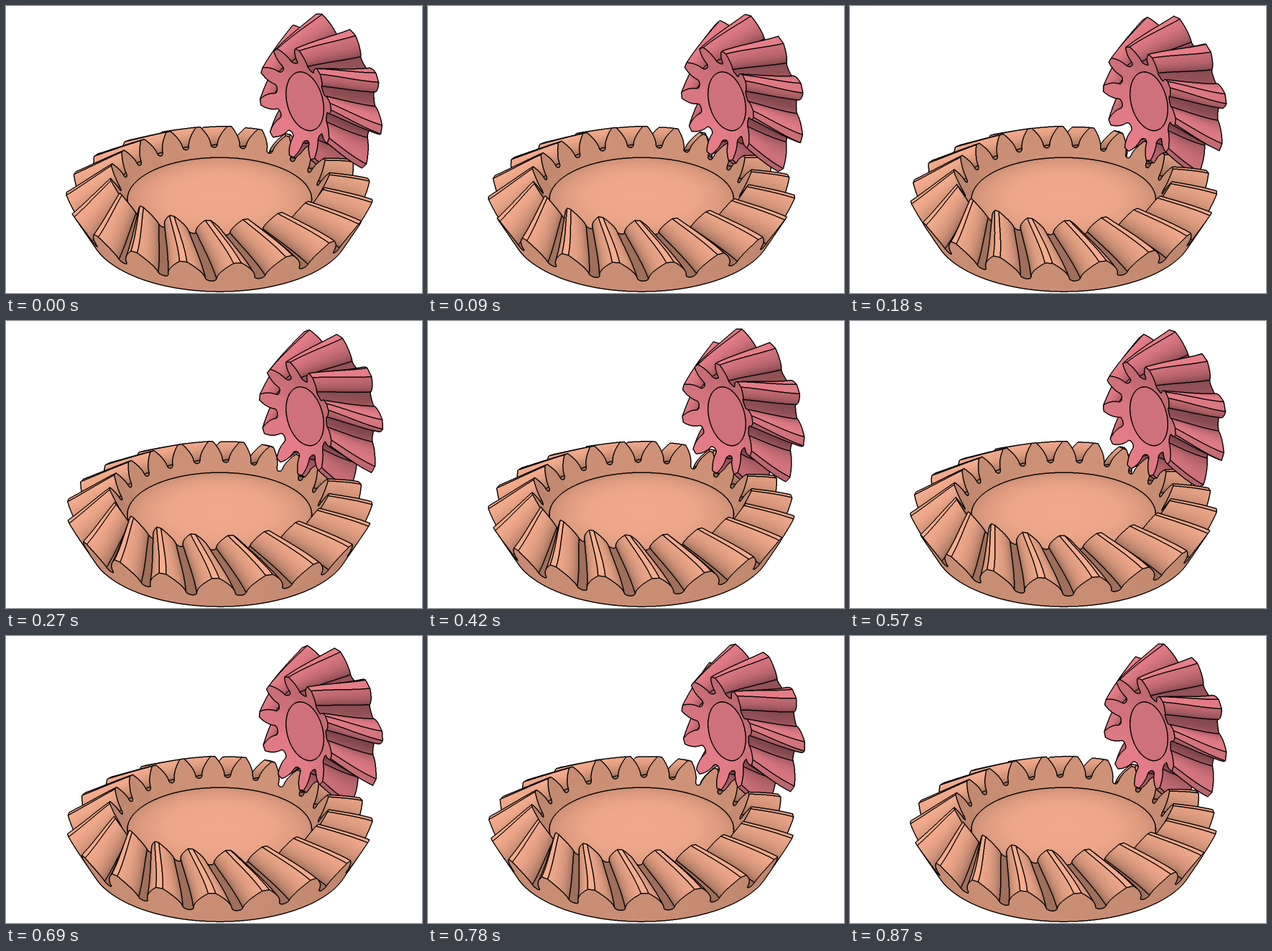
Write an HTML page with a canvas that moves like this. It is 579x400 px and loops after 900 ms.

```html
<!DOCTYPE html>
<html lang="en">
<head>
<meta charset="utf-8">
<title>Spiral bevel gears</title>
<style>
html, body { margin: 0; width: 100%; height: 100%; overflow: hidden; background: #fff; }
canvas { display: block; }
</style>
</head>
<body>
<canvas id="stage" width="579" height="400"></canvas>
<script>
const W = 579, H = 400, SS = 2, BW = W * SS, BH = H * SS;
const STEP = 30, STEPS = 15;
const RAD = Math.PI / 180;
const ctx = document.getElementById('stage').getContext('2d');

// Camera: origin at the centre of the ring's outer tip circle.
const DIST = 1500, CX = 297.5, CY = 252;
const SIN_E = 0.443, COS_E = Math.sqrt(1 - SIN_E * SIN_E);
const LIGHT = [-0.1, -0.42, 0.9];
const APEX = 94, AXIS = 34.7 * RAD;
const AX = Math.cos(AXIS), AY = Math.sin(AXIS);

const depth = new Float32Array(BW * BH);
const shade = new Float32Array(BW * BH);
const ids = new Uint16Array(BW * BH);

// Half a tooth mirrored: f is the share of one pitch, u the depth below the tip.
function toothProfile(tip, neck, power) {
  const half = [{ f: tip, u: 0, part: 0 }];
  for (let i = 1; i <= 6; i++) {
    half.push({ f: tip + (neck - tip) * (1 - (1 - i / 6) ** power), u: 0.85 * i / 6, part: 2 });
  }
  for (let i = 1; i <= 4; i++) {
    const a = i / 4 * Math.PI / 2;
    half.push({ f: neck + (0.5 - neck) * (1 - Math.cos(a)), u: 0.85 + 0.15 * Math.sin(a), part: 3 });
  }
  const left = half.map((p, i) => ({
    f: -p.f, u: p.u,
    part: i === 0 ? 0 : half[i].part === 2 ? 1 : 4
  })).reverse();
  // The part names the segment that ends at each point.
  const all = left.concat(half);
  const n = half.length;
  return all.map((p, i) => {
    if (i === 0 || i > n) return p;
    return { f: p.f, u: p.u, part: i === n ? 0 : all[i - 1].part };
  });
}

// Corner points are [radius, height along the axis]; index 0 is the inner end.
const ring = {
  teeth: 20, base: 0, phase: 12.4, turn: 1, spiral: 11.5, bow: 6,
  tip: [[151, 27], [211.5, 0]], root: [[136.7, -1.6], [193.6, -35.8]],
  rim: [[128.5, -14.6], [182.5, -58]],
  profile: toothProfile(0.07, 0.39, 1.6), endShade: [0.89, 1.03], discEdge: 0.86,
  place: (r, h, a) => [r * Math.cos(a), r * Math.sin(a), h]
};
const pinion = {
  teeth: 10, base: 100, phase: -2, turn: -1, spiral: -22, bow: -11,
  tip: [[82, 128], [118, 188]], root: [[56, 141], [80, 207]],
  rim: [[42.7, 147], null],
  profile: toothProfile(0.09, 0.31, 1.7), endShade: [1.06, 1], discEdge: 1.04,
  place: (r, h, a) => {
    const side = r * Math.sin(a);
    return [h * AX - side * AY, h * AY + side * AX, APEX + r * Math.cos(a)];
  }
};
const COLORS = [[237, 166, 137], [223, 122, 132]];

function project(p, lum) {
  const far = DIST + p[1] * COS_E - p[2] * SIN_E;
  const s = DIST / far;
  return {
    p, lum,
    x: (CX + s * p[0]) * SS,
    y: (CY - s * (p[2] * COS_E + p[1] * SIN_E)) * SS,
    z: s
  };
}

function fillTriangle(a, b, c, id, light) {
  const area = (b.x - a.x) * (c.y - a.y) - (b.y - a.y) * (c.x - a.x);
  if (Math.abs(area) < 1e-6) return;
  const x0 = Math.max(0, Math.ceil(Math.min(a.x, b.x, c.x) - 0.5));
  const x1 = Math.min(BW - 1, Math.floor(Math.max(a.x, b.x, c.x) - 0.5));
  const y0 = Math.max(0, Math.ceil(Math.min(a.y, b.y, c.y) - 0.5));
  const y1 = Math.min(BH - 1, Math.floor(Math.max(a.y, b.y, c.y) - 0.5));
  for (let y = y0; y <= y1; y++) {
    const py = y + 0.5;
    for (let x = x0; x <= x1; x++) {
      const px = x + 0.5;
      const wb = ((px - a.x) * (c.y - a.y) - (py - a.y) * (c.x - a.x)) / area;
      const wc = ((b.x - a.x) * (py - a.y) - (b.y - a.y) * (px - a.x)) / area;
      const wa = 1 - wb - wc;
      if (wa < -1e-5 || wb < -1e-5 || wc < -1e-5) continue;
      const i = y * BW + x;
      const z = wa * a.z + wb * b.z + wc * c.z;
      if (z <= depth[i]) continue;
      depth[i] = z;
      ids[i] = id;
      shade[i] = light * (wa * a.lum + wb * b.lum + wc * c.lum);
    }
  }
}

function lightOf(a, b, c) {
  const u = a.p.map((v, i) => b.p[i] - v), w = a.p.map((v, i) => c.p[i] - v);
  const n = [u[1] * w[2] - u[2] * w[1], u[2] * w[0] - u[0] * w[2], u[0] * w[1] - u[1] * w[0]];
  const len = Math.hypot(...n) || 1;
  const facing = n[2] * SIN_E - n[1] * COS_E < 0 ? -1 : 1;
  const dot = (n[0] * LIGHT[0] + n[1] * LIGHT[1] + n[2] * LIGHT[2]) * facing / len;
  return 0.83 + 0.19 * dot;
}

function quad(a, b, c, d, id) {
  const light = lightOf(a, b, d);
  fillTriangle(a, b, c, id, light);
  fillTriangle(a, c, d, id, light);
}

const mix = (a, b, t) => a + (b - a) * t;

function drawGear(g, time) {
  const pitch = 360 / g.teeth, ROWS = 10;
  const start = g.phase + g.turn * pitch * time;
  const angle = (k, f, v) => (start + pitch * (k + f) + g.spiral * v + g.bow * v * (1 - v)) * RAD;
  const vertex = (k, q, v, lum) => {
    const at = i => mix(mix(g.tip[0][i], g.tip[1][i], v), mix(g.root[0][i], g.root[1][i], v), q.u);
    return project(g.place(at(0), at(1), angle(k, q.f, v)), lum);
  };
  const rimVertex = (k, f, end, scale, lum) =>
    project(g.place(g.rim[end][0] * scale, g.rim[end][1], angle(k, f, end)), lum);
  const rings = [0, 0.4, 0.6, 0.8, 0.9, 1];
  const discLum = s => mix(g === ring ? 1.01 : 1.04, g.discEdge, s ** 4);

  for (let k = 0; k < g.teeth; k++) {
    const rows = [];
    for (let j = 0; j <= ROWS; j++) {
      rows.push(g.profile.map(q => vertex(k, q, j / ROWS, 1.02 - 0.36 * q.u ** 1.7)));
    }
    for (let i = 1; i < g.profile.length; i++) {
      const q0 = g.profile[i - 1], q1 = g.profile[i];
      // Both fillets of one groove share an id.
      const groove = q1.part === 3 ? (k + 1) % g.teeth : k;
      const id = g.base + 4 + groove * 4 + Math.min(q1.part, 3);
      for (let j = 0; j < ROWS; j++) {
        quad(rows[j][i - 1], rows[j][i], rows[j + 1][i], rows[j + 1][i - 1], id);
      }
      for (let end = 0; end < 2; end++) {
        if (!g.rim[end]) continue;
        const lum = g.endShade[end];
        quad(vertex(k, q0, end, lum), vertex(k, q1, end, lum),
          rimVertex(k, q1.f, end, 1, lum), rimVertex(k, q0.f, end, 1, lum), g.base + 2 + end);
      }
    }
    for (let s = 0; s < 4; s++) {
      const f0 = s / 4 - 0.5, f1 = f0 + 0.25;
      for (let j = 1; j < rings.length; j++) {
        const near = rings[j - 1], out = rings[j];
        quad(rimVertex(k, f0, 0, out, discLum(out)), rimVertex(k, f1, 0, out, discLum(out)),
          rimVertex(k, f1, 0, near, discLum(near)), rimVertex(k, f0, 0, near, discLum(near)), g.base + 1);
      }
    }
  }
}

// Outlines follow every border between two surfaces.
function isEdge(x, y) {
  if (x < 1 || y < 1 || x >= BW - 2 || y >= BH - 2) return false;
  const i = y * BW + x, id = ids[i];
  return ids[i - 1] !== id || ids[i + 2] !== id || ids[i + 1] !== id ||
    ids[i - BW] !== id || ids[i + BW] !== id || ids[i + 2 * BW] !== id;
}

function renderFrame(time) {
  depth.fill(0);
  ids.fill(0);
  drawGear(ring, time);
  drawGear(pinion, time);
  const image = ctx.createImageData(W, H), out = image.data;
  for (let y = 0; y < H; y++) {
    for (let x = 0; x < W; x++) {
      let r = 0, g = 0, b = 0;
      for (let s = 0; s < SS * SS; s++) {
        const bx = x * SS + s % SS, by = y * SS + (s >> 1), i = by * BW + bx;
        if (isEdge(bx, by)) { r += 12; g += 8; b += 7; continue; }
        if (!ids[i]) { r += 255; g += 255; b += 255; continue; }
        const color = COLORS[ids[i] >= pinion.base ? 1 : 0];
        r += color[0] * shade[i];
        g += color[1] * shade[i];
        b += color[2] * shade[i];
      }
      const o = (y * W + x) * 4, n = SS * SS;
      out[o] = r / n;
      out[o + 1] = g / n;
      out[o + 2] = b / n;
      out[o + 3] = 255;
    }
  }
  return image;
}

const cache = [];
let shown = -1;

function show(now) {
  const step = Math.floor((now + 0.01) / STEP) % STEPS;
  if (step !== shown) {
    cache[step] = cache[step] || renderFrame(step / STEPS);
    ctx.putImageData(cache[step], 0, 0);
    shown = step;
  }
  requestAnimationFrame(show);
}
show(performance.now());
</script>
</body>
</html>
```
